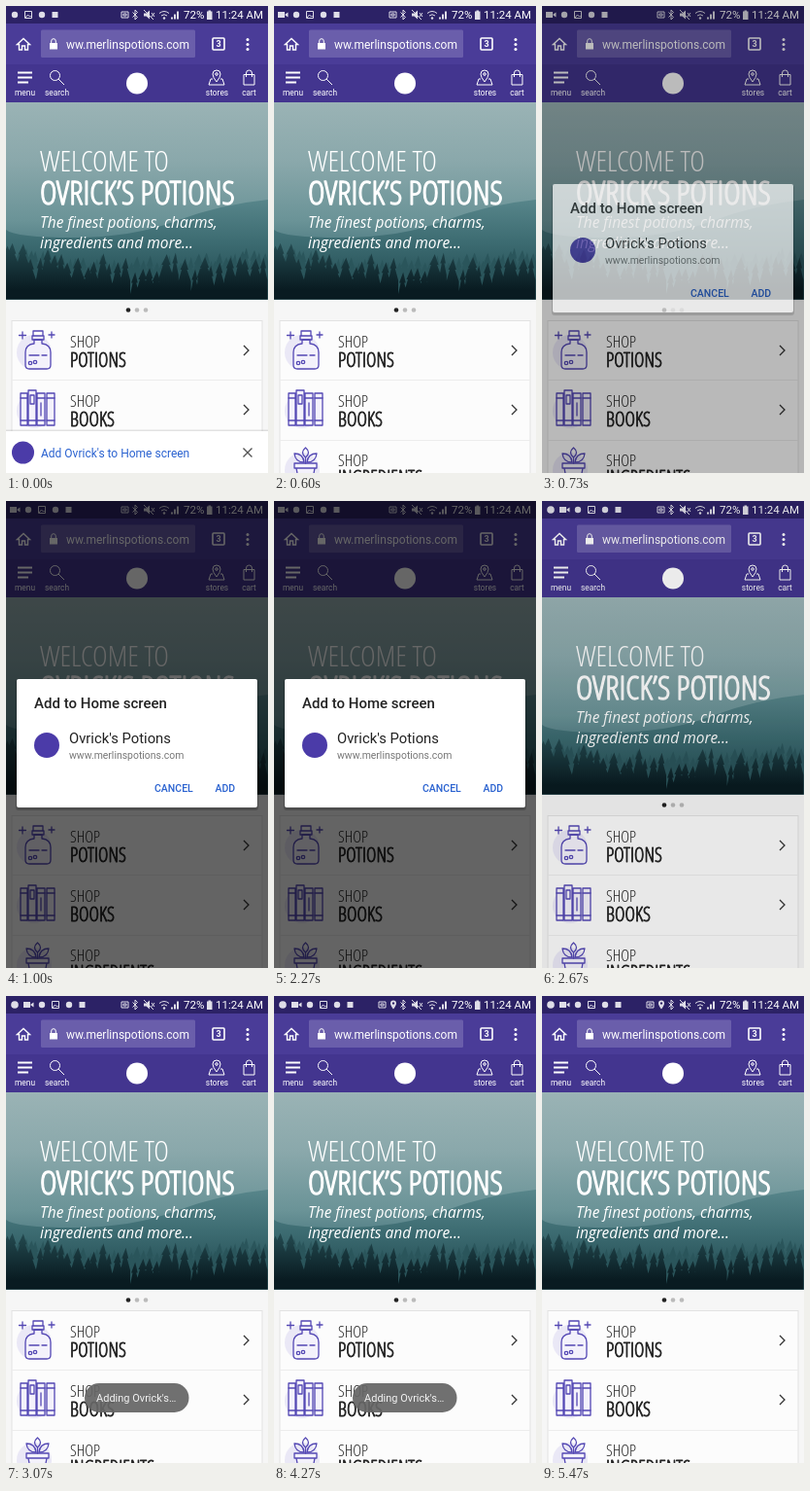
Recreate the animation shown at these times as an HTML page. Size 270 by 480 pixels, loop 5940 ms.

```html
<!DOCTYPE html>
<html lang="en">
<head>
<meta charset="utf-8">
<title>Add to Home screen</title>
<style>
  html, body { margin: 0; height: 100%; overflow: hidden; background: #f6f6f6; }
  svg { display: block; width: 100vw; height: 100vh; }
  text { font-family: Roboto, sans-serif; }
  .cond { font-family: "Open Sans", sans-serif; font-stretch: 75%; font-weight: 300; }
  .heavy { stroke: currentColor; stroke-linejoin: round; }
  .lead { font-family: "Open Sans", sans-serif; font-style: italic; }
  .nav text { font-size: 8.4px; text-anchor: middle; }
  .line { fill: none; stroke: #fff; stroke-width: 1; }
  .ink { fill: none; stroke: #5448b4; stroke-width: 1.3; stroke-linejoin: round; stroke-linecap: round; }
</style>
</head>
<body>
<svg viewBox="0 0 270 480">
  <defs>
    <linearGradient id="sky" x1="0" y1="0" x2="0" y2="1">
      <stop offset="0" stop-color="#9ab3b5"/>
      <stop offset=".3" stop-color="#8aa8ab"/>
      <stop offset=".6" stop-color="#6a9397"/>
      <stop offset=".8" stop-color="#44727a"/>
    </linearGradient>
    <linearGradient id="hill" x1="0" y1="200" x2="0" y2="290" gradientUnits="userSpaceOnUse">
      <stop offset="0" stop-color="#57858a"/>
      <stop offset=".5" stop-color="#3b6a70"/>
      <stop offset="1" stop-color="#234b52"/>
    </linearGradient>
    <linearGradient id="wood" x1="0" y1="245" x2="0" y2="292" gradientUnits="userSpaceOnUse">
      <stop offset="0" stop-color="#23494f"/>
      <stop offset="1" stop-color="#091b21"/>
    </linearGradient>
    <clipPath id="photo"><path d="M0 99h270v202.500H0z"/></clipPath>
    <clipPath id="address"><path d="M62 25h133v28H62z"/></clipPath>
  </defs>

  <rect width="270" height="480" fill="#f6f6f6"/>

  <g clip-path="url(#photo)">
    <rect y="99" width="270" height="203" fill="url(#sky)"/>
    <path d="M270 199Q220 204 175 221T70 238T0 230V302H270z" fill="url(#hill)"/>
    <path id="farTrees" fill="#2a555b"/>
    <path id="nearTrees" fill="url(#wood)"/>
  </g>
  <g id="hero" fill="#fff" color="#fff">
    <text class="lead" x="35" y="228" data-width="183">The finest potions, charms,</text>
    <text class="lead" x="35" y="249" data-width="158">ingredients and more...</text>
  </g>

  <g fill="#bbb">
    <circle cx="126" cy="312.500" r="2.300" fill="#222"/>
    <circle cx="135" cy="312.500" r="2.300"/>
    <circle cx="144" cy="312.500" r="2.300"/>
  </g>
  <rect x="6" y="323.500" width="258" height="170" fill="#fcfcfc" stroke="#e2e2e2"/>
  <path d="M6 384.500h258M6 446.500h258" stroke="#ececec"/>
  <g fill="#eae8f6">
    <circle cx="29" cy="356" r="18"/><circle cx="29" cy="416" r="18"/><circle cx="29" cy="477" r="18"/>
  </g>
  <g class="ink">
    <path fill="#f3f1fb" d="M29 343v4q-9 1-9 9v13q0 4 4 4h18q4 0 4-4v-13q0-8-9-9v-4z"/>
    <path d="M28 334h10v5H28zM27 339h12v4H27zM24 359h10M37 359h5M17 335v7M13.500 338.500h7M47 335v6M44 338h6"/>
    <circle cx="25" cy="367" r="1.700"/><circle cx="30" cy="366" r="1.700"/>
    <path fill="#f3f1fb" d="M15 398h7v33h-7zM23 395h8v36h-8zM32 398h8v33h-8zM42 398h8v33h-8z"/>
    <path d="M15 403h7M15 426h7M25 400h4v9h-4zM23 426h8M32 403h8M36 408v13M32 426h8M42 403h8M42 426h8"/>
    <path fill="#f3f1fb" d="M21 470h23v5H21zM23 475l3 16h13l3-16"/>
    <path d="M32.500 470v-6M32.500 464q-6-5 0-10 6 5 0 10M31 469q-9 0-10-9 9 0 10 9M34 469q9 0 10-9-9 0-10 9"/>
  </g>
  <g id="rows" fill="#222" color="#222"></g>
  <path d="M245 349l5 5-5 5M245 410l5 5-5 5" fill="none" stroke="#333" stroke-width="1.300"/>

  <rect width="270" height="18" fill="#2c2266"/>
  <rect y="18" width="270" height="42" fill="#4a3c98"/>
  <rect y="60" width="270" height="39" fill="#43358f"/>
  <rect x="36" y="24.500" width="159" height="28.500" rx="1.500" fill="#6a5eab"/>

  <g fill="#fff">
    <g opacity=".85">
      <circle id="appDot" cx="9" cy="9" r="3.800"/>
      <path id="camera" d="M4 6h7v6H4zM11.500 8.500l3-2v5l-3-2z"/>
      <g id="notices">
        <circle cx="9" cy="9" r="3.200"/>
        <path class="line" d="M19.500 5.500h7v7h-7zM20 12l2.500-3 2 2 1-1 1 1"/>
        <circle cx="37" cy="9" r="3.200"/>
        <rect x="47.500" y="6" width="6" height="6"/>
      </g>
      <path id="cast" class="line" d="M119 6h7v6h-7zM121 8h3v2h-3z"/>
      <path id="pin" d="M123 4.500a3 3 0 0 1 3 3q0 2-3 6-3-4-3-6a3 3 0 0 1 3-3zm0 1.800a1.200 1.200 0 1 0 .01 0z"/>
      <path class="line" d="M130.500 6.500l5 5-2.500 2.500v-10l2.500 2.500-5 5"/>
      <path d="M142 7.500h2.500l3.500-3v9l-3.500-3H142z"/>
      <path class="line" d="M142 4l10 10M150 7l3 4M153 7l-3 4"/>
      <path class="line" d="M158 7.500q5-4 10 0M160 10q3-2.500 6 0"/>
      <circle cx="163" cy="12.500" r="1.200"/>
      <path d="M170 13.500h2v-2h-2zM173 13.500h2v-5h-2zM176 13.500h2v-8h-2z"/>
      <path d="M207 5.500h1.500v-1h2.500v1h1.500v8.500H207z"/>
    </g>
    <text x="183" y="13" font-size="11.500">72%</text>
    <text x="216" y="13" font-size="11.500">11:24 AM</text>

    <path class="line" style="stroke-width:1.400" d="M11.500 39.500l6.500-6 6.500 6h-2V45h-3v-4h-3v4h-3v-5.500z"/>
    <path d="M45 38h8v6.500h-8z"/>
    <path class="line" d="M46.700 38v-2a2.300 2.300 0 0 1 4.600 0v2"/>
    <text x="189" y="43.500" font-size="12" text-anchor="end" clip-path="url(#address)">www.merlinspotions.com</text>
    <rect x="213" y="33" width="12" height="12" rx="1" class="line" style="stroke-width:1.600"/>
    <text x="219" y="42.300" font-size="9" font-weight="700" text-anchor="middle">3</text>
    <circle cx="249" cy="34.500" r="1.500"/><circle cx="249" cy="39.500" r="1.500"/><circle cx="249" cy="44.500" r="1.500"/>
  </g>

  <g class="nav" fill="#fff">
    <path d="M12 68.500h15M12 73.500h15M12 78.500h11" stroke="#fff" stroke-width="1.800"/>
    <circle cx="50.500" cy="71.500" r="5" class="line"/>
    <path d="M54 75l6 6" class="line"/>
    <circle cx="135" cy="79.500" r="11"/>
    <path class="line" d="M217 66a4 4 0 0 1 4 4q0 3-4 8-4-5-4-8a4 4 0 0 1 4-4zM213 75h-2l-2 6h16l-2-6h-2"/>
    <circle cx="217" cy="70" r="1.300" class="line"/>
    <path class="line" d="M245 70.500h11v10.500h-11zM247.500 73v-4a3 3 0 0 1 6 0v4"/>
    <text x="19.500" y="92">menu</text>
    <text x="52.500" y="92">search</text>
    <text x="217.500" y="92">stores</text>
    <text x="250.500" y="92">cart</text>
  </g>

  <g id="banner">
    <rect y="435.500" width="270" height="2" opacity=".1"/>
    <rect y="437" width="270" height="43" fill="#fff"/>
    <circle cx="17.500" cy="459" r="11.500" fill="#4b3ba8"/>
    <text x="36" y="463.500" font-size="12" fill="#2a62d0">Add Ovrick's to Home screen</text>
    <path d="M244.500 454.500l9 9M253.500 454.500l-9 9" stroke="#555" stroke-width="1.400"/>
  </g>

  <rect id="dim" width="270" height="480"/>
  <g id="dialog">
    <rect x="10" y="184" width="250" height="134" rx="3" opacity=".2"/>
    <rect x="11" y="183" width="248" height="132" rx="2" fill="#fff"/>
    <text x="29" y="212.500" font-size="15" font-weight="500" fill="#222">Add to Home screen</text>
    <circle cx="42" cy="251" r="13" fill="#4b3ba8"/>
    <text x="65" y="249" font-size="14.800" fill="#222">Ovrick's Potions</text>
    <text x="65" y="265" font-size="10.450" fill="#777">www.merlinspotions.com</text>
    <g font-size="10.500" font-weight="500" fill="#2a62d0">
      <text x="153" y="298.500">CANCEL</text>
      <text x="215.500" y="298.500">ADD</text>
    </g>
  </g>
  <g id="toast">
    <rect x="81" y="398" width="107.500" height="30" rx="15" fill="#666" opacity=".93"/>
    <text x="93" y="417" font-size="11" fill="#f2f2f2">Adding Ovrick's…</text>
  </g>
</svg>
<script>
const LOOP = 5940;
const $ = id => document.getElementById(id);

// Condensed caps centred on a line; a stroke gives the heavier cut
const caps = (text, x, middle, width, stroke) =>
  `<text class="cond ${stroke ? 'heavy' : ''}" x="${x}" y="${middle}" dy=".357em" data-width="${width}" stroke-width="${stroke}">${text}</text>`;

$('hero').innerHTML += caps('WELCOME TO', 35, 159, 133, 0) + caps('OVRICK’S POTIONS', 35, 192.5, 201, 1.3);
$('rows').innerHTML = [['POTIONS', 58, 345, 364], ['BOOKS', 46, 406, 425], ['INGREDIENTS', 87, 467, 485]]
  .map(([name, width, top, bottom]) => caps('SHOP', 66, top, 31, 0) + caps(name, 66, bottom, width, .8))
  .join('');

// Pick the type size at which each line has its measure
for (const el of document.querySelectorAll('[data-width]')) {
  el.setAttribute('font-size', 20);
  el.setAttribute('font-size', 20 * el.dataset.width / el.getComputedTextLength());
}

let seed = 7;
const random = () => (seed = seed * 16807 % 2147483647) / 2147483647;

// A row of firs that rises towards both edges
function forest(level, rise, step, height) {
  let d = '';
  for (let x = -4; x < 276; x += step * (.6 + random() * .8)) {
    const rim = ((x - 135) / 135) ** 2;
    const top = level - rim * rise - random() * height;
    const half = 4 + random() * 4;
    d += `M${x} ${top}l${half * .5} 11h-1.500l${half * .6} 12V302H${x - half}V${top + 23}l${half * .5}-12h-1.500z`;
  }
  return d;
}
$('farTrees').setAttribute('d', forest(266, 12, 6, 10));
$('nearTrees').setAttribute('d', forest(274, 14, 8, 20));

const progress = (t, from, to) => Math.min(1, Math.max(0, (t - from) / (to - from)));
const easeOut = p => 1 - (1 - p) ** 2;
const smooth = p => p * p * (3 - 2 * p);
const fade = (t, inAt, inEnd, outAt, outEnd) =>
  easeOut(progress(t, inAt, inEnd)) - easeOut(progress(t, outAt, outEnd));
const show = (id, opacity) => $(id).setAttribute('opacity', +opacity);
const move = (id, x, y) => $(id).setAttribute('transform', `translate(${x} ${y})`);

const start = performance.now();
function draw() {
  const t = (performance.now() - start) % LOOP;
  const recording = t >= 400, added = t >= 2470, located = t >= 3670;
  move('banner', 0, 48 * smooth(progress(t, 70, 600)));
  show('dim', .6 * fade(t, 640, 1000, 2440, 2800));
  show('dialog', fade(t, 640, 840, 2440, 2640));
  show('toast', fade(t, 2700, 3050, 4500, 5000));
  show('appDot', added);
  show('camera', recording);
  move('camera', 14 * added, 0);
  move('notices', 14 * (recording + added), 0);
  show('pin', located);
  move('cast', -11 * located, 0);
  requestAnimationFrame(draw);
}
draw();
</script>
</body>
</html>
```
